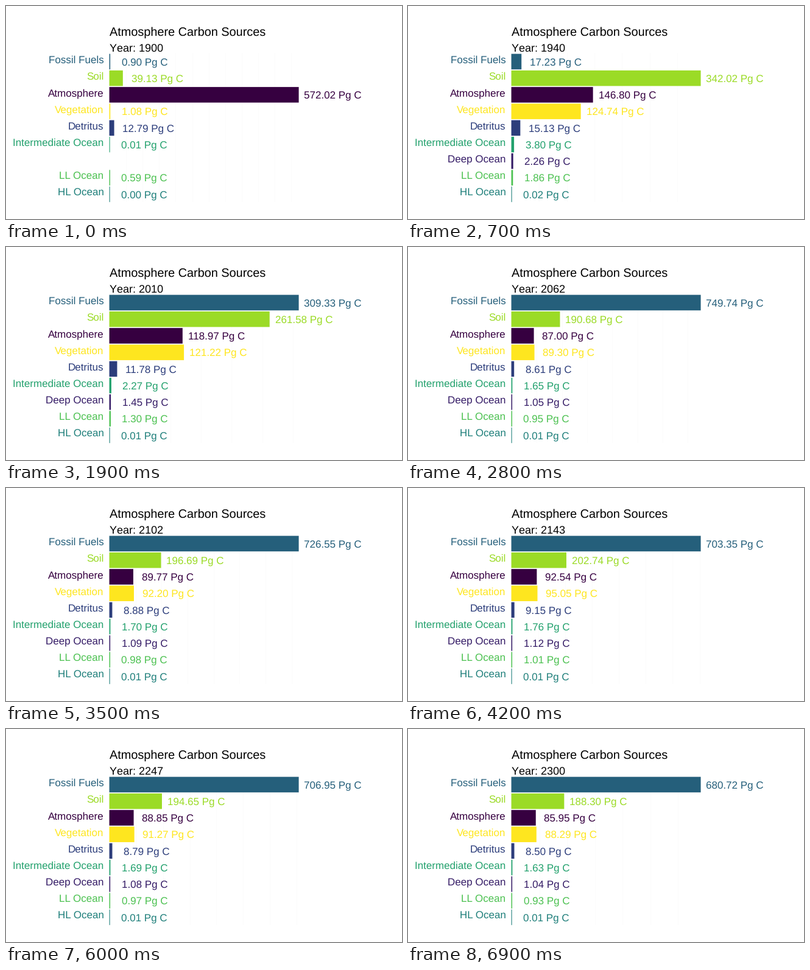
A matplotlib script that plays this animation: 650 px wide and 350 px high, repeating every 10000 ms.

```python
import numpy as np
import matplotlib.pyplot as plt
from matplotlib.animation import FuncAnimation
from matplotlib.patches import Rectangle

W, H, DPI = 650, 350, 100
LAST, FRAMES, STEP = 69, 100, 100
X0, X1 = 170.1, 480.0
ROW0, PITCH, BAR, EDGE = 91.4, 27.25, 24.5, 1.07
SIZE = 17.07
SPACE = 0.278 * SIZE

plt.rcParams["font.family"] = "Liberation Sans"
plt.rcParams["text.hinting"] = "none"

COLORS = {"Fossil Fuels": "#255f7b", "Soil": "#9bdb26",
          "Atmosphere": "#360040", "Vegetation": "#fee61f",
          "Detritus": "#2c3d7b", "Intermediate Ocean": "#22a16d",
          "Deep Ocean": "#341b66", "LL Ocean": "#4bc150",
          "HL Ocean": "#1e7f7a"}
DEEP = list(COLORS).index("Deep Ocean")

# turning points: step, fossil carbon, all other carbon (Pg C)
KEYS = np.array([[0, 0.90, 625.61], [7, 17.23, 636.63], [19, 309.33, 518.57],
                 [28, 749.74, 379.25], [42, 703.35, 403.38],
                 [51, 722.68, 397.96], [69, 680.72, 374.65]])

# settled share of the other carbon, starting ratio to it, yearly decay, bump
MIX = {"Atmosphere": (0.22941, 3.9856, 0.157, 0),
       "Vegetation": (0.23565, 0.0073, 0.0437, 0),
       "Detritus": (0.02269, 0.901, 0.157, 0.11),
       "Intermediate Ocean": (0.004355, 0.0037, 0.157, 0.86),
       "Deep Ocean": (0.00278, 0, 0.157, 0.64),
       "LL Ocean": (0.002492, 0.378, 0.157, 0.40),
       "HL Ocean": (0.000022, 0, 0.157, 0.86)}


def monotone(x, y, at):
    """Cubic Hermite interpolation that never overshoots its keys."""
    h = np.diff(x)
    d = np.diff(y) / h
    m = np.r_[d[0], np.zeros(len(x) - 2), d[-1]]
    for i in range(1, len(x) - 1):
        a, b = d[i - 1], d[i]
        if a * b > 0:
            wa, wb = h[i - 1] + 2 * h[i], 2 * h[i - 1] + h[i]
            m[i] = (wa + wb) / (wb / a + wa / b)
    i = np.clip(np.searchsorted(x, at, side="right") - 1, 0, len(h) - 1)
    s, g = (at - x[i]) / h[i], h[i]
    return (y[i] * (1 + 2 * s) * (1 - s) ** 2 + y[i + 1] * s * s * (3 - 2 * s)
            + g * m[i] * s * (1 - s) ** 2 + g * m[i + 1] * s * s * (s - 1))


def amounts(k):
    """Carbon per row: shares relax to a settled mix, soil takes the rest."""
    years = k * 400 / LAST
    u = years / 14
    fossil, other = (monotone(KEYS[:, 0], KEYS[:, c], k) for c in (1, 2))
    parts = [other * share * (1 + (start - 1) * np.exp(-rate * years)
                              + bump * u * np.exp(1 - u))
             for share, start, rate, bump in MIX.values()]
    return [fossil, other - sum(parts), *parts]


fig = plt.figure(figsize=(W / DPI, H / DPI), dpi=DPI, facecolor="white")
ax = fig.add_axes([0, 0, 1, 1])
ax.set(xlim=(0, W), ylim=(H, 0))
ax.axis("off")


def write(x, y, s="", size=SIZE, color="black", ha="left"):
    return ax.text(x, y, s, fontsize=size * 72 / DPI, color=color, ha=ha,
                   va="baseline", zorder=3)


write(X0, 49, "Atmosphere Carbon Sources", 19.88)
write(X0, 75, "Y", 18)
year = write(X0 + 12, 75, size=18)

grid = [ax.plot([0, 0], [77, 321], color="#fafafa", lw=0.8 * 72 / DPI,
                zorder=1)[0] for _ in range(12)]
bars, names, labels = [], [], []
for i, (name, c) in enumerate(COLORS.items()):
    y = ROW0 + PITCH * i
    bar = Rectangle((X0 - EDGE / 2, y - (BAR + EDGE) / 2), EDGE, BAR + EDGE,
                    facecolor=c, edgecolor="none", snap=False, zorder=2)
    bars.append(ax.add_patch(bar))
    names.append(write(160.5, y + 2.5, name, color=c, ha="right"))
    labels.append(write(X0, y + 6.65, color=c))


def draw(frame):
    k = min(frame, LAST)
    row = amounts(k)
    top = max(row)
    scale = (X1 - X0) / top
    year.set_text(f"ear: {1900 + k * 400 // LAST}")

    gap = 50 if top < 600 else 100
    for n, line in enumerate(grid, 1):
        x = X0 + n * gap * scale
        line.set_xdata([x, x])
        line.set_visible(x < X1)

    for bar, label, v in zip(bars, labels, row):
        bar.set_width(v * scale + EDGE)
        num = f"{v:.2f}"
        label.set_text(num + " Pg C")
        label.set_x(X0 + v * scale + SPACE * (8 - len(num)))

    for part in (bars[DEEP], names[DEEP], labels[DEEP]):
        part.set_visible(k > 0)
    return [year, *grid, *bars, *names, *labels]


anim = FuncAnimation(fig, draw, frames=FRAMES, interval=STEP, repeat=True,
                     repeat_delay=0, init_func=lambda: draw(0), blit=False)
plt.show()
```
